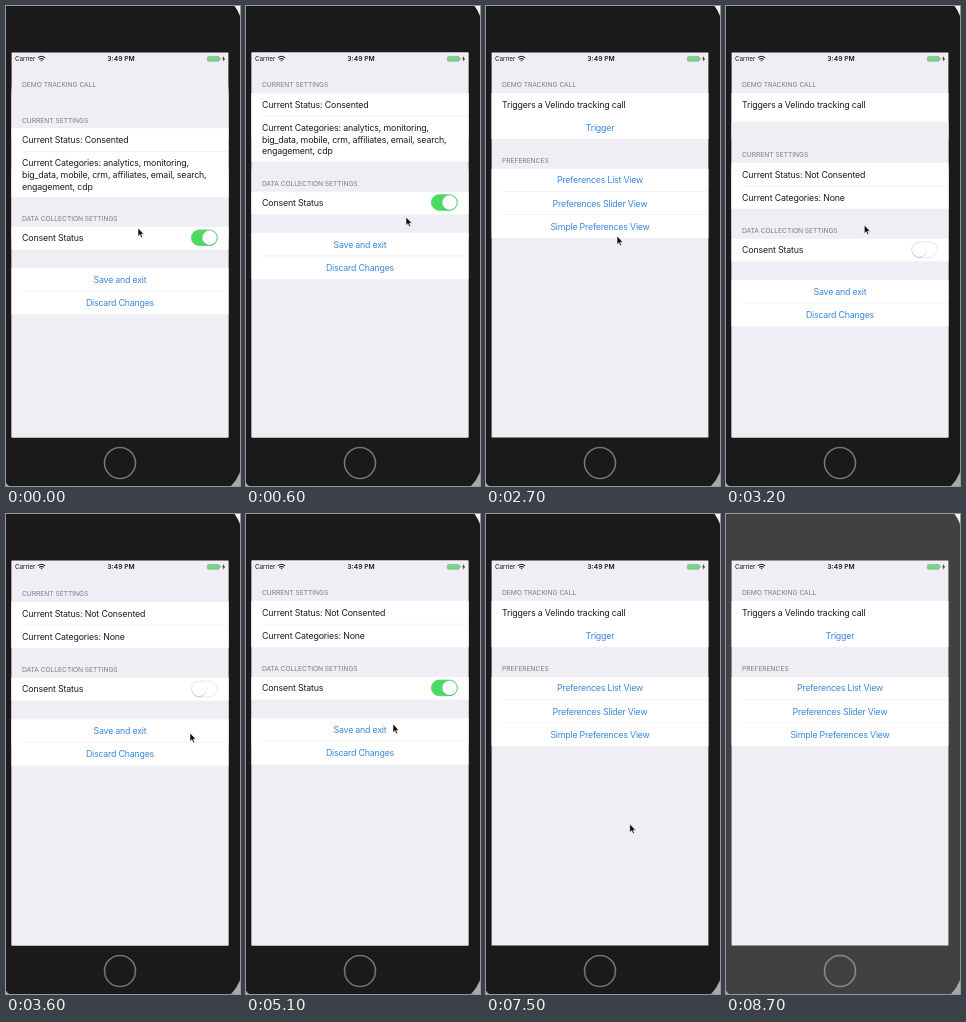
An HTML page for the animation above (8800 ms loop, 234 px wide and 480 px high).

```html
<!DOCTYPE html>
<html lang="en">
<head>
<meta charset="utf-8">
<title>Consent preferences</title>
<style>
  html, body { margin: 0; width: 234px; height: 480px; overflow: hidden; background: #eee; }
  svg { display: block; background: linear-gradient(#f1f1f1 50%, #a8a8a8); }
  text { font: 8.8px Inter, "Liberation Sans", sans-serif; letter-spacing: -.15px; fill: #1c1c1f; white-space: pre; }
  .head { font-size: 6.7px; letter-spacing: -.04px; fill: #7d7d84; }
  .link { letter-spacing: -.2px; fill: #3a88dd; text-anchor: middle; }
  .bar { font-size: 6.4px; letter-spacing: -.1px; }
  .time { font-size: 6.7px; letter-spacing: 0; font-weight: 600; text-anchor: middle; }
</style>
</head>
<body>
<svg id="stage" width="234" height="480" viewBox="0 0 234 480">
  <defs><clipPath id="glass"><rect x="5.6" y="46.6" width="216.8" height="385"/></clipPath></defs>
  <rect id="body" x="-8" y="-14" width="244" height="504" rx="36"/>
  <circle id="home" cx="114" cy="457" r="15.5" fill="none" stroke-width="1.6"/>
  <g clip-path="url(#glass)">
    <g id="main"></g>
    <g id="full"></g>
    <g id="short"></g>
    <text class="bar" x="9" y="55.3">Carrier</text>
    <g fill="none" stroke="#111" stroke-width="1.1">
      <path d="M32 51.8Q35.5 48.8 39 51.8M33.3 53.4Q35.5 51.5 37.7 53.4"/>
      <path d="M34.3 54.2h2.4l-1.2 1.4z" fill="#111" stroke="none"/>
    </g>
    <text class="bar time" x="115" y="55.3">3:49 PM</text>
    <rect x="201.4" y="50.4" width="12" height="4.8" rx="1.2" fill="#72d983" stroke="#8fae95" stroke-width=".7"/>
    <path d="M214.6 51.8v2" stroke="#8fae95" stroke-width=".8"/>
    <path d="M218.2 49.8l-2 3.4h1.4l-.5 2.6 2-3.4h-1.4z" fill="#111"/>
  </g>
  <path id="cursor" d="M0 0V8.4L1.9 6.7 3.2 9.7 4.6 9.1 3.3 6.2H5.9Z" fill="#080808" stroke="#fff" stroke-width=".6"/>
</svg>
<script>
const LOOP = 8800, STEP = 100, HEIGHT = 385;
const $ = id => document.getElementById(id);

const label = (x, y, s, cls = '') => `<text class="${cls}" x="${x}" y="${y}">${s}</text>`;
const head = (y, s) => label(16, y + 2.4, s, 'head');
const row = (y, s) => label(16, y + 3.1, s);
const link = (y, s) => label(114, y + 3.1, s, 'link');
const card = (y, h) => `<rect x="5" y="${y}" width="218" height="${h}" fill="#fff"/>`;
const line = y => `<path d="M16 ${y}H222" stroke="#ebebef" stroke-width=".6"/>`;
const page = '<rect x="5" y="46" width="218" height="387" fill="#eeeef4"/>';

const toggle = y => `<g transform="translate(185 ${y - 8.1})">
  <rect class="track" x=".4" y=".4" width="26" height="15.6" rx="7.8" stroke-width=".8"/>
  <circle class="shade" cy="9.2" r="7.2" fill="#000" opacity=".16"/>
  <circle class="knob" cy="8.2" r="7.2" fill="#fff" stroke="#d9d9dc" stroke-width=".3"/></g>`;

function settings(status, categories) {
  const low = 110 + 23 + (categories.length - 1) * 11.3;
  return page + head(79, 'CURRENT SETTINGS') + card(87, low - 87) + line(110.2) +
    row(99, 'Current Status: ' + status) +
    categories.map((s, i) => row(122 + i * 11.6, s)).join('') +
    head(low + 21.7, 'DATA COLLECTION SETTINGS') + card(low + 30, 22.6) +
    row(low + 41.2, 'Consent Status') + toggle(low + 40.8) +
    card(low + 71.3, 46.2) + line(low + 94.3) +
    link(low + 82.8, 'Save and exit') + link(low + 106.2, 'Discard Changes');
}

$('main').innerHTML = page + head(79, 'DEMO TRACKING CALL') + card(87, 46) +
  row(98.7, 'Triggers a Velindo tracking call') + link(121.6, 'Trigger') +
  head(155, 'PREFERENCES') + card(163, 69) + line(185.6) + line(208.6) +
  link(174.1, 'Preferences List View') + link(197.6, 'Preferences Slider View') +
  link(221, 'Simple Preferences View');
$('full').innerHTML = settings('Consented', [
  'Current Categories: analytics, monitoring,',
  'big_data, mobile, crm, affiliates, email, search,',
  'engagement, cdp'
]);
$('short').innerHTML = settings('Not Consented', ['Current Categories: None']);

// time, x, y of the pointer tip
const path = [
  [0, 132, 222], [200, 134, 221], [600, 160, 211], [1100, 197, 194], [1350, 197, 194],
  [1750, 131, 230], [2700, 131, 230], [2900, 132, 219], [3100, 133, 219], [3600, 184, 219],
  [3950, 198, 171], [4350, 198, 171], [5100, 147, 210], [5250, 137, 214], [6100, 137, 214],
  [6300, 100, 102], [6500, 44, 180], [6700, 90, 274], [6850, 149, 250], [6950, 138, 225],
  [7100, 137, 224], [7400, 150, 290], [7900, 90, 482]
];
const sheets = [
  { id: 'full', open: -320, close: 1850, flip: 1250, on: 1 },
  { id: 'short', open: 2950, close: 5400, flip: 4050, on: 0 }
];

const clamp = v => Math.max(0, Math.min(1, v));
const ease = v => v * v * (3 - 2 * v);
const spring = (t, tau) => t <= 0 ? 1 : (1 + t / tau) * Math.exp(-t / tau);

function pointer(t) {
  const i = path.findIndex(p => p[0] > t);
  if (i < 0) return path[path.length - 1].slice(1);
  const [a, b] = [path[i - 1], path[i]];
  const k = ease((t - a[0]) / (b[0] - a[0]));
  return [1, 2].map(n => a[n] + (b[n] - a[n]) * k);
}

function setToggle(sheet, k) {
  const mix = (a, b) => Math.round(a + (b - a) * k);
  const track = sheet.querySelector('.track');
  track.setAttribute('fill', `rgb(${mix(255, 76)},${mix(255, 217)},${mix(255, 100)})`);
  track.setAttribute('stroke', `rgb(${mix(226, 76)},${mix(226, 217)},${mix(229, 100)})`);
  for (const c of sheet.querySelectorAll('circle')) c.setAttribute('cx', 8.2 + 10.4 * k);
}

function draw(t) {
  for (const s of sheets) {
    const g = $(s.id);
    const shown = t >= s.open && t < s.close + 450;
    g.style.display = shown ? '' : 'none';
    if (!shown) continue;
    const y = HEIGHT * (t < s.close ? spring(t - s.open, 80) : 1 - spring(t - s.close, 70));
    g.setAttribute('transform', `translate(0 ${y.toFixed(2)})`);
    const turned = ease(clamp((t - s.flip) / 250));
    setToggle(g, s.on ? 1 - turned : turned);
  }
  const [x, y] = pointer(t);
  $('cursor').setAttribute('transform', `translate(${x.toFixed(1)} ${y.toFixed(1)})`);
  $('cursor').style.display = t < 7900 ? '' : 'none';
  const pale = t >= 8700;
  $('body').setAttribute('fill', pale ? '#414141' : '#1a1a1a');
  $('home').setAttribute('stroke', pale ? '#8c8c8c' : '#757575');
}

function tick() {
  draw(Math.floor(performance.now() % LOOP / STEP) * STEP);
  requestAnimationFrame(tick);
}
tick();
</script>
</body>
</html>
```
